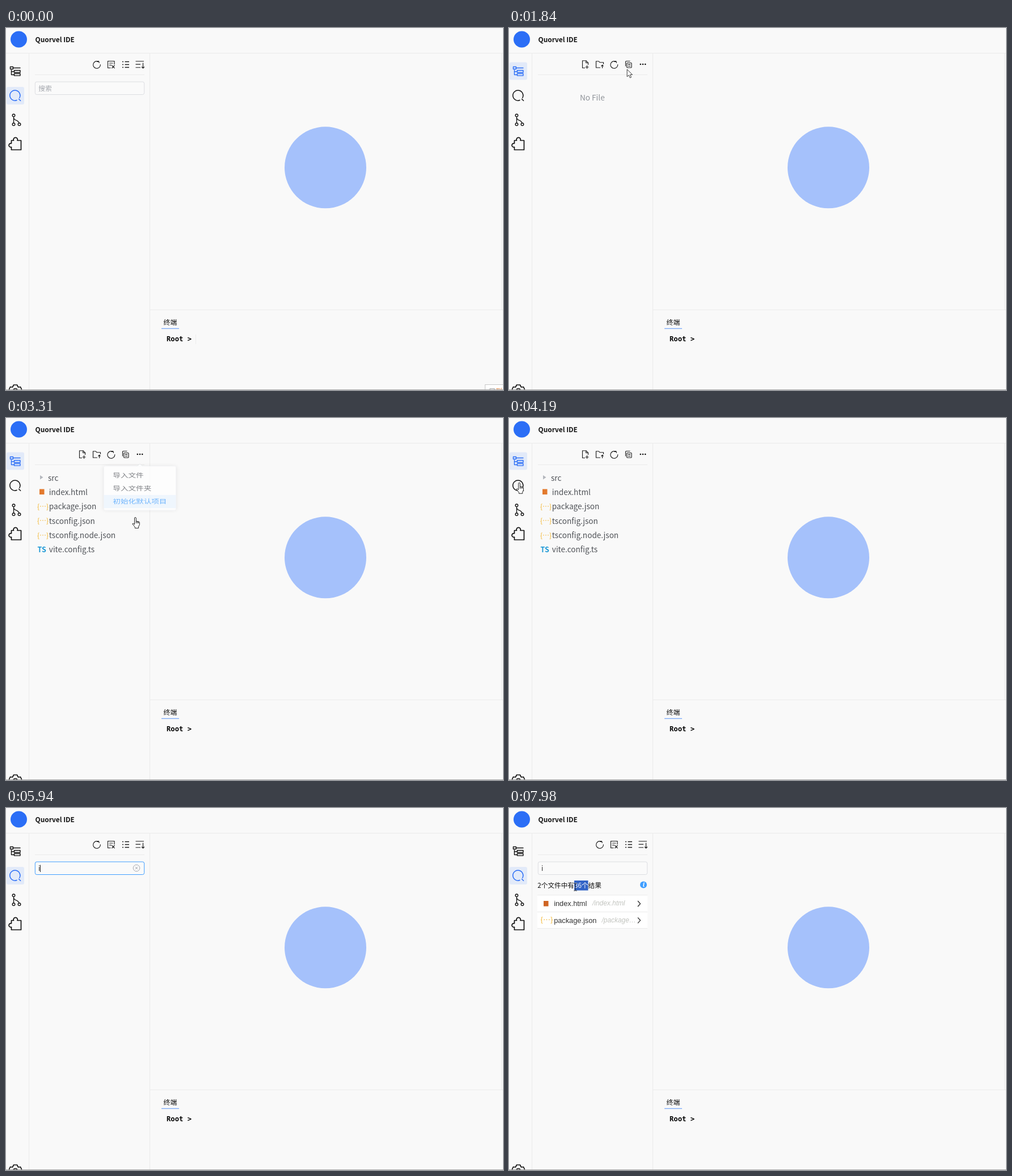
These frames come from a looping animation (876x639 px, 8 s). An HTML page:

```html
<!DOCTYPE html>
<html lang="zh">
<head>
<meta charset="utf-8">
<title>IDE</title>
<style>
html, body { margin: 0; width: 100%; height: 100%; overflow: hidden; background: #f9f9f9; }
svg { display: block; }
text { font: 13.6px "Noto Sans CJK SC", "Noto Sans CJK", "Noto Sans", sans-serif; fill: #4f5257; }
.small { font-size: 11.9px; }
.arial { font: 12.75px "Liberation Sans", Arial, sans-serif; fill: #333; }
.path { font: italic 11.9px "Liberation Sans", Arial, sans-serif; fill: #c2c4bf; }
.mono { font: bold 12.2px "DejaVu Sans Mono", monospace; fill: #000; }
.json { font-weight: 500; font-size: 12px; fill: #f2b52f; }
.rule { stroke: #ebebeb; fill: none; }
.icon { fill: none; stroke: #1c1c1c; stroke-width: 1.15; }
.side { fill: none; stroke: #111; stroke-width: 1.5; stroke-linejoin: round; }
.side.on { stroke: #2b6ef6; }
</style>
</head>
<body>
<svg id="stage" width="876" height="639" viewBox="0 0 876 639">
  <defs>
    <filter id="shade" x="-20%" y="-20%" width="140%" height="140%">
      <feDropShadow dx="0" dy="0" stdDeviation="4" flood-color="#000" flood-opacity=".12"/>
    </filter>
    <path id="refresh" d="M4.6 -4.6A6.4 6.4 0 1 0 6.4 .8M1.4 -5.2H4.9V-1.9" transform="rotate(-14)"/>
    <path id="chevron" d="M-2 -5L2.5 0L-2 5"/>
  </defs>
  <rect width="876" height="639" fill="#f9f9f9"/>
  <path class="rule" d="M0 44.5H876M40.5 45V639M253.5 45V639M51 82.5H244M254 497.5H876M873.5 45V497"/>

  <circle cx="22.5" cy="20" r="14.5" fill="#2b6ef6"/>
  <text class="small" x="51.5" y="24.5" font-weight="700" style="font-weight:700;fill:#111">Quorvel IDE</text>
  <circle cx="563" cy="246.300" r="72" fill="#a5c1fb"/>

  <text class="small" x="277.500" y="523.500" style="fill:#111">终端</text>
  <path d="M274 530.500H305" stroke="#79a8f8" stroke-width="1.300"/>
  <text class="mono" x="283" y="553">Root &gt;</text>
  <path id="termCaret" d="M334.500 541V558" stroke="#ededed"/>
  <g id="tip">
    <rect x="844.500" y="629.500" width="40" height="20" fill="#fff" stroke="#c8c8c8"/>
    <text class="small" x="851" y="645" style="fill:#999">口<tspan fill="#e08a4c">到</tspan></text>
  </g>

  <rect id="active" x="1" width="31" height="31" rx="3" fill="#e2eaf9"/>
  <g id="tree" class="side" style="stroke-width:1.400">
    <path d="M12.500 70.500H25.500M9.500 73.500V82.500H14.500M9.500 77H14.500"/>
    <rect x="7.500" y="68.500" width="5" height="4"/>
    <rect x="14.500" y="74.700" width="10.500" height="3.800"/>
    <rect x="14.500" y="80.500" width="10.500" height="3.600"/>
  </g>
  <path id="lens" class="side" d="M19.500 127.300A9 9 0 1 1 23.500 123.800M22.300 125L26 128.700"/>
  <g class="side" style="stroke-width:1.350">
    <circle cx="13.500" cy="154.300" r="2.300"/><circle cx="13.500" cy="170" r="2.300"/><circle cx="23.500" cy="170" r="2.300"/>
    <path d="M13.500 156.700V167.600M13.500 158.500C14 164 21.500 161.500 23 167.600"/>
  </g>
  <path class="side" style="stroke-width:1.700" d="M9.500 198.500H13.500A3.600 3.600 0 1 1 20 198.500H26.500V215H9.500V210.200A3.400 3.400 0 1 1 9.500 203.700Z"/>
  <g class="side" style="stroke-width:1.700">
    <path d="M5 639L7.500 633.500L11.500 634L13.500 630H19.500L21.500 634L25.500 633.500L28 639"/>
    <circle cx="16.500" cy="640.500" r="4"/>
  </g>
  <path d="M0 638.500H876" stroke="#a9a9a9"/>

  <g id="explorer">
    <g class="icon">
      <path d="M134 70.500H129.500V57.700H136L139.500 61.200V65M135.700 57.700V61.500H139.500M137.500 66V72M134.500 69H140.500"/>
      <path d="M161 70H153.500V58.700H158L160 60.700H166.500V64M164.500 65.500V71M162.500 67.500L164.500 65.300L166.500 67.500"/>
      <use href="#refresh" x="185.300" y="65"/>
      <rect x="207.700" y="61.500" width="8.300" height="8.500" rx="1"/>
      <path d="M205.500 67.500V59.500Q205.500 58.500 206.500 58.500H213.500M209.700 64.300H214M209.700 67.200H214"/>
    </g>
    <g fill="#111"><circle cx="231.800" cy="64" r="1.300"/><circle cx="236" cy="64" r="1.300"/><circle cx="240.200" cy="64" r="1.300"/></g>
    <text id="empty" x="125" y="128" style="fill:#8f9399">No File</text>
    <g id="files">
      <path d="M60 101L65.500 104.800L60 108.600Z" fill="#b4b7bd"/>
      <text x="74" y="110.500">src</text>
      <rect x="59" y="125.500" width="8.500" height="9.500" fill="#e37a2e"/>
      <text class="ts" x="55.500" y="236.500" style="font-size:12.500px;font-weight:700;fill:#1c98d6">TS</text>
    </g>
  </g>

  <g id="search">
    <g class="icon">
      <use href="#refresh" x="160" y="65"/>
      <path d="M184.500 70.500H179.500V58.500H191V64.500M182 62H188.500M182 65.500H186M186.500 66L191.500 71M191.500 66L186.500 71"/>
      <path d="M205 59.500H207M205 64.500H207M205 69.500H207M209.500 59.500H217M209.500 64.500H217M209.500 69.500H217" stroke-width="1.400"/>
      <path d="M228.500 58.700H243M228.500 64.200H237M228.500 69.700H237M241.500 61.500V71M239 68.500L241.500 71L244 68.500"/>
    </g>
    <rect id="box" x="51.300" y="95" width="192.400" height="22.500" rx="3" fill="#fafafa"/>
    <text id="hint" class="small" x="57" y="110.500" style="fill:#a5a8ae">搜索</text>
    <text id="typed" class="small" x="57" y="110.500" style="fill:#333">i</text>
    <path id="caret" stroke="#222" d="M0 100.500V113"/>
    <g id="clear" fill="none" stroke="#a8abb2">
      <circle cx="230" cy="106" r="5.800"/><path d="M227.800 103.800L232.200 108.200M232.200 103.800L227.800 108.200"/>
    </g>
    <g id="results">
      <rect id="sel" y="128" height="17.500" fill="#3364c6"/>
      <text x="50.300" y="141" style="font-size:11.650px;fill:#111">2个文件中有<tspan id="num">36</tspan><tspan id="unit">个</tspan>结果</text>
      <circle cx="237" cy="135.500" r="6" fill="#409eff"/>
      <text x="235.500" y="139.300" style="font:italic bold 10.500px 'Noto Serif',serif;fill:#fff">i</text>
      <rect x="50" y="154" width="194" height="58.500" fill="#fff"/>
      <path class="rule" d="M50 153.800H244M50 183.500H244M50 212.500H244"/>
      <rect x="61" y="164" width="8.500" height="9.500" fill="#cf6524"/>
      <text class="arial" x="79.200" y="173">index.html</text>
      <text class="path" x="147" y="172.300">/index.html</text>
      <text class="json" x="55.500" y="202.300" style="font-size:13px">{…}</text>
      <text class="arial" x="79.200" y="202.700">package.json</text>
      <text class="path" x="163.500" y="202">/package…</text>
      <g class="icon"><use href="#chevron" x="229" y="169"/><use href="#chevron" x="229" y="198.300"/></g>
    </g>
  </g>

  <g id="menu">
    <path d="M230.500 85.500L236 80L241.500 85.500" fill="#fff" stroke="#e4e7ed"/>
    <rect x="172.500" y="85" width="127" height="104" rx="3" fill="#fff" stroke="#eceef2" stroke-width=".6" filter="url(#shade)"/>
    <path d="M231 85.500L236 80.500L241 85.500Z" fill="#fff"/>
    <rect id="hover" x="172.500" width="127" height="31.200" fill="#ecf5ff"/>
  </g>

  <g id="pointer">
    <path id="arrow" d="M0 0V13L3.100 10.200L5.200 15L7.400 14L5.300 9.400H9.300Z" fill="#fff" stroke="#222" stroke-width=".9" stroke-linejoin="round"/>
    <path id="hand" d="M-1.300 12V1A1.400 1.400 0 0 1 1.500 1V6.200L6 7Q7.600 7.300 7.500 9V12.500L5.800 16V18.500H-.500V16.500L-5 11Q-4 8.700 -1.300 12ZM1.500 6V10M3.700 6.600V10M5.700 7V10" fill="#fff" stroke="#222" stroke-width="1" stroke-linejoin="round"/>
    <path id="beam" d="M-2.700 -6.500H-.800L0 -5.800L.800 -6.500H2.700M0 -5.800V5.800M-2.700 6.500H-.800L0 5.800L.800 6.500H2.700" fill="none" stroke="#222"/>
  </g>
</svg>
<script>
const LOOP = 8000, NS = 'http://www.w3.org/2000/svg';
const el = id => document.getElementById(id);
const show = (id, on) => { el(id).style.display = on ? '' : 'none'; };
const within = (t, a, b) => t >= a && t < b;
const easeOut = p => 1 - (1 - Math.min(1, Math.max(0, p))) ** 5;

function label(parent, str, x, y, cls) {
  const node = document.createElementNS(NS, 'text');
  node.setAttribute('x', x);
  node.setAttribute('y', y);
  if (cls) node.setAttribute('class', cls);
  node.textContent = str;
  return el(parent).appendChild(node);
}

['index.html', 'package.json', 'tsconfig.json', 'tsconfig.node.json', 'vite.config.ts'].forEach((name, i) => {
  const y = 135.8 + i * 25.4;
  label('files', name, 75.8, y);
  if (name.endsWith('json')) label('files', '{…}', 55, y - .5, 'json');
});
const items = ['导入文件', '导入文件夹', '初始化默认项目'].map((s, i) => label('menu', s, 188.300, 111.300 + i * 31.300));

// Pointer stops: time, x, y, shape used from that time on
const stops = [
  [70, 872, 641, 'arrow'], [250, 610, 480, 'arrow'], [480, 270, 270, 'arrow'], [820, 48, 115, 'arrow'],
  [900, 26, 92, 'hand'], [1000, 19, 77, 'hand'], [1300, 20, 77, 'hand'], [1480, 42, 82, 'arrow'],
  [1630, 96, 80, 'arrow'], [1840, 208, 73, 'arrow'], [2040, 234, 65, 'hand'], [2450, 233, 63, 'hand'],
  [2510, 231, 91, 'arrow'], [2580, 230, 112, 'hand'], [2780, 228, 176, 'hand'], [3310, 228, 176, 'hand'],
  [3320, 226, 175, 'arrow'], [3850, 40, 130, 'arrow'], [3930, 27, 119, 'hand'], [4100, 18, 115, 'hand'],
  [4450, 18, 114, 'hand'], [4680, 33, 103, 'arrow'], [4900, 62, 107, 'beam'], [5080, 82, 110, 'beam'],
  [6670, 82, 110, 'beam'], [6770, 98, 124, 'arrow'], [6880, 118, 138, 'beam'], [6950, 125, 141, 'beam'],
  [7300, 139, 138, 'beam'], [7500, 139, 138, 'beam'], [7780, 124, 139, 'beam'], [7980, 117, 139.5, 'beam'],
  [8000, 117, 139.5, 'beam']
];
const OPEN = 2300, CLOSE = 3294, FOCUS = 5150, TYPE = 5940, BLUR = 7500;

function drawPointer(t) {
  const i = stops.findIndex(s => s[0] > t);
  // Hidden before entering and while typing
  show('pointer', i > 0 && !within(t, TYPE, 6670));
  if (i < 1) return;
  const [t0, x0, y0, shape] = stops[i - 1], [t1, x1, y1] = stops[i];
  const p = (t - t0) / (t1 - t0);
  el('pointer').setAttribute('transform', `translate(${x0 + (x1 - x0) * p} ${y0 + (y1 - y0) * p})`);
  for (const s of ['arrow', 'hand', 'beam']) show(s, s === shape);
}

function drawMenu(t) {
  const s = easeOut((t - OPEN) / 300) - easeOut((t - CLOSE) / 300);
  show('menu', s > .01);
  el('menu').setAttribute('transform', `translate(0 85) scale(1 ${s}) translate(0 -85)`);
  el('menu').setAttribute('opacity', s);
  const row = t < 2570 ? -1 : t < 2650 ? 0 : t < 2720 ? 1 : 2;
  show('hover', row >= 0);
  el('hover').setAttribute('y', 90.7 + row * 31.2);
  items.forEach((node, i) => { node.style.fill = i === row ? '#409eff' : '#55585e'; });
}

function drawSearch(t) {
  const focused = within(t, FOCUS, BLUR), typed = t >= TYPE;
  const hovered = within(t, 4850, FOCUS);
  el('box').style.stroke = focused ? '#409eff' : hovered ? '#b9bcc2' : '#dcdee2';
  show('hint', !typed);
  show('typed', typed);
  show('clear', typed && focused);
  const blink = (t - (typed ? TYPE : FOCUS)) % 1060 < 530;
  show('caret', focused && blink);
  el('caret').setAttribute('transform', `translate(${typed ? 60.5 : 57.5} 0)`);

  show('results', t >= 6070);
  const left = t < 7640 ? 139.5 : t < 7980 ? 127.8 : 115;
  el('sel').setAttribute('x', left);
  el('sel').setAttribute('width', 139.5 - left);
  el('unit').style.fill = left < 139 ? '#fff' : '#111';
  el('num').style.fill = left < 120 ? '#fff' : '#111';
}

function draw(t) {
  const files = within(t, 1100, 4250);
  show('tip', t < 70);
  show('termCaret', t < 1100);
  show('explorer', files);
  show('search', !files);
  show('empty', t < 3110);
  show('files', t >= 3110);
  el('active').setAttribute('y', files ? 60.5 : 104);
  el('tree').classList.toggle('on', files);
  el('lens').classList.toggle('on', !files);
  drawMenu(t);
  drawSearch(t);
  drawPointer(t);
}

const start = performance.now();
function tick(now) {
  draw(Math.max(0, now - start) % LOOP);
  requestAnimationFrame(tick);
}
draw(0);
requestAnimationFrame(tick);
</script>
</body>
</html>
```
